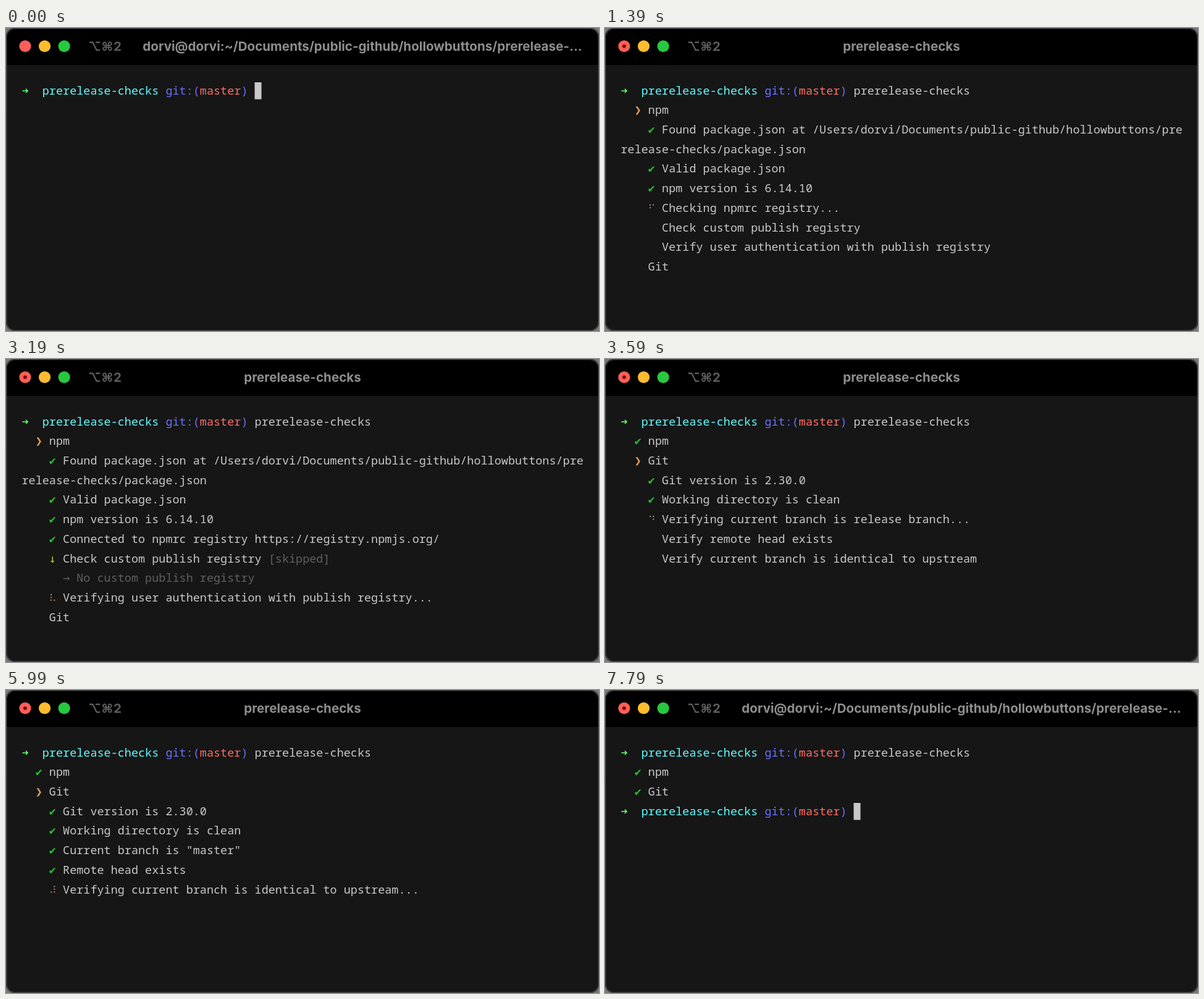
Write an HTML page with a canvas that moves like this. It is 960x491 px and loops after 8.19 s.

```html
<!DOCTYPE html>
<html lang="en">
<head>
<meta charset="utf-8">
<title>prerelease-checks</title>
<style>
  html, body { margin: 0; width: 960px; height: 491px; overflow: hidden; background: #000; }
  canvas { display: block; }
</style>
</head>
<body>
<canvas id="stage" width="960" height="491"></canvas>
<script>
const ctx = document.getElementById('stage').getContext('2d');
const LOOP = 8190;
const LEFT = 25.5, BASELINE = 107.6, CELL = 11.09, LINE = 31.7;
const MONO = '"Noto Sans Mono", monospace';
const SYMBOLS = '"DejaVu Sans Mono", monospace';
const TITLE_FONT = '700 20.6px Inter, sans-serif';
const TEXT = '#c9c9c9', DIM = '#606060';
const COLORS = { '✔': '#2abf35', '❯': '#e5a05f', '↓': '#c0cc3c', '➜': '#5ffa68', '→': DIM };
const SPINNER = '⠋⠙⠹⠸⠼⠴⠦⠧⠇⠏';

const USER = 'dorvi';
const FOLDER = 'public-github/hollowbuttons';
const SHELL_TITLE = `${USER}@${USER}:~/Documents/${FOLDER}/prerelease-...`;

// Task lists: '*' marks the spinner, '_' the cursor.
const found = ['  ❯ npm', `    ✔ Found package.json at /Users/${USER}/Documents/${FOLDER}/pre`,
  'release-checks/package.json', '    ✔ Valid package.json'];
const version = '    ✔ npm version is 6.14.10';
const connected = '    ✔ Connected to npmrc registry https://registry.npmjs.org/';
const custom = '      Check custom publish registry';
const auth = '      Verify user authentication with publish registry';
const git = ['  ✔ npm', '  ❯ Git', '    ✔ Git version is 2.30.0'];
const clean = '    ✔ Working directory is clean';
const branch = '    ✔ Current branch is "master"';
const remote = '      Verify remote head exists';
const upstream = '      Verify current branch is identical to upstream';
const done = ['  ✔ npm', '  ✔ Git'];

const COMMAND = '➜  prerelease-checks git:(master) prerelease-checks';
const PROMPT = '➜  prerelease-checks git:(master) _';
const scenes = [
  [0, [PROMPT]],
  [190, [COMMAND + '_']],
  [390, [COMMAND, ...found, '    * Verifying npm version...', '      Check npmrc registry', custom, auth, '    Git']],
  [990, [COMMAND, ...found, version, '    * Checking npmrc registry...', custom, auth, '    Git']],
  [1990, [COMMAND, ...found, version, connected, '    ↓ Check custom publish registry [skipped]',
    '      → No custom publish registry', '    * Verifying user authentication with publish registry...', '    Git']],
  [3390, [COMMAND, ...git, clean, '    * Verifying current branch is release branch...', remote, upstream]],
  [3790, [COMMAND, ...git, clean, branch, '    * Verifying remote head exists...', upstream]],
  [5390, [COMMAND, ...git, clean, branch, '    ✔ Remote head exists',
    '    * Verifying current branch is identical to upstream...']],
  [7590, [COMMAND, ...done]],
  [7790, [COMMAND, ...done, PROMPT]]
];

// The screen refreshes every 200 ms, apart from two longer holds.
function refreshTime(t) {
  if (t < 190) return 0;
  if (t >= 590 && t < 990) return 590;
  const start = t < 590 ? 190 : 990;
  return Math.min(7790, start + 200 * Math.floor((t - start) / 200));
}

function put(text, x, y, color, font, align = 'left') {
  ctx.font = font;
  ctx.fillStyle = color;
  ctx.textAlign = align;
  ctx.fillText(text, x, y);
}

function disc(x, y, r, color) {
  ctx.fillStyle = color;
  ctx.beginPath();
  ctx.arc(x, y, r, 0, 2 * Math.PI);
  ctx.fill();
}

function drawSpinner(x, y, t) {
  const step = Math.floor(2.98 + (t - 590) / 105.5);
  const bits = SPINNER.charCodeAt((step + 10) % 10) - 0x2800;
  ctx.fillStyle = '#d8a878';
  for (let i = 0; i < 6; i++) {
    if (bits >> i & 1) ctx.fillRect(x + (i < 3 ? 2.4 : 7.6), y - 12 + i % 3 * 4.5, 1.8, 1.8);
  }
}

function drawRow(row, index, t) {
  const y = BASELINE + index * LINE;
  const isPrompt = row[0] === '➜';
  const dimFrom = row.search(/→|\[skipped/);
  const colorAt = col => {
    if (dimFrom >= 0 && col >= dimFrom) return DIM;
    if (!isPrompt || col > 32) return TEXT;
    return col < 20 ? '#60fdff' : col > 25 && col < 32 ? '#ff6e67' : '#6871ff';
  };
  [...row].forEach((char, col) => {
    const x = LEFT + col * CELL;
    if (char === '_') {
      ctx.fillStyle = TEXT;
      ctx.fillRect(x, Math.round(y - 20), 11, 27.5);
    } else if (char === '*') {
      drawSpinner(x, y, t);
    } else if (COLORS[char]) {
      put(char, x, y, COLORS[char], `18.42px ${SYMBOLS}`);
    } else if (char !== ' ') {
      put(char, x, y, colorAt(col), `${isPrompt && col < 33 ? 500 : 400} 18.48px ${MONO}`);
    }
  });
}

function panel(x, y, w, h, radii) {
  ctx.beginPath();
  ctx.roundRect(x, y, w, h, radii);
}

function drawWindow(t) {
  ctx.fillStyle = '#777';
  ctx.fillRect(0, 0, 960, 491);
  ctx.fillStyle = '#000';
  panel(0, 0, 960, 491, 14);
  ctx.fill();
  ctx.fillStyle = '#161616';
  panel(1, 60, 958, 430, [0, 0, 14, 14]);
  ctx.fill();
  ctx.strokeStyle = '#484848';
  ctx.lineWidth = 1.5;
  panel(0.75, 0.75, 958.5, 489.5, 14);
  ctx.stroke();

  ['#ff5f57', '#febc2e', '#28c840'].forEach((color, i) => disc(31 + 31.6 * i, 29.5, 9.6, color));
  if (t >= 990) disc(31, 29.5, 3, '#7a0f0a');
  put('⌥⌘2', 133, 37, '#5c5c5c', TITLE_FONT);
  const idle = t < 390 || t >= 7790;
  if (idle) put(SHELL_TITLE, 577, 37, '#8e8e8e', TITLE_FONT, 'center');
  else put('prerelease-checks', 480, 37, '#8e8e8e', TITLE_FONT, 'center');
}

function render(now) {
  const t = refreshTime(now % LOOP);
  const rows = scenes.findLast(([start]) => start <= t)[1];
  drawWindow(t);
  rows.forEach((row, i) => drawRow(row, i, t));
  requestAnimationFrame(render);
}
requestAnimationFrame(render);
</script>
</body>
</html>
```
